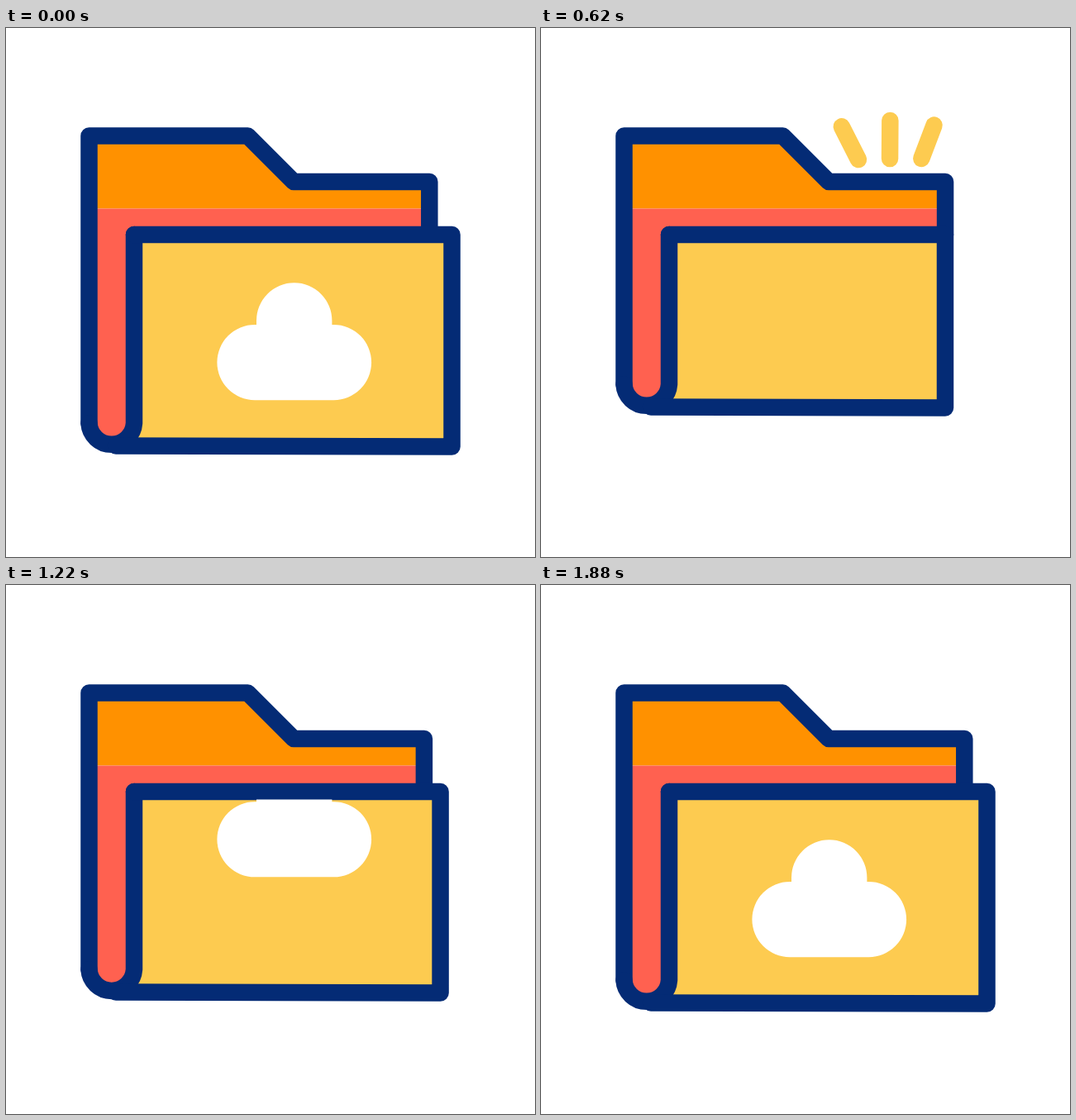
Write an HTML page with a canvas that moves like this. It is 640 px wide and 640 px high and loops after 2700 ms.

```html
<!DOCTYPE html>
<html lang="en">
<head>
<meta charset="utf-8">
<title>Folder upload and download</title>
<style>
html, body { margin: 0; height: 100%; overflow: hidden; background: #fff; }
canvas { display: block; width: 100vw; height: 100vh; object-fit: contain; }
</style>
</head>
<body>
<canvas id="stage" width="640" height="640"></canvas>
<script>
const LOOP = 2700;
const NAVY = '#042b75', ORANGE = '#ff9100', RED = '#ff6150', YELLOW = '#fdcb50';
const c = document.getElementById('stage').getContext('2d');
c.lineCap = c.lineJoin = 'round';

// Smooth progress from 0 to 1 between times a and b
function ease(t, a, b) {
  const u = Math.min(1, Math.max(0, (t - a) / (b - a)));
  return (1 - Math.cos(Math.PI * u)) / 2;
}

function fill(path, color) {
  c.fillStyle = color;
  c.fill(new Path2D(path));
}

function stroke(path, color, width = 20.5) {
  c.strokeStyle = color;
  c.lineWidth = width;
  c.stroke(new Path2D(path));
}

// A streak runs along its path: the head leaves first, the tail catches up
function streaks(lines, color, head, tail) {
  if (head <= 0 || tail >= 1) return;
  for (const [x1, y1, x2, y2] of lines) {
    const at = p => `${x1 + (x2 - x1) * p} ${y1 + (y2 - y1) * p}`;
    stroke(`M${at(tail)}L${at(head)}`, color);
  }
}

const RISE = [[266.5, 446, 266.5, 354], [342, 446, 342, 409], [425, 445, 425, 353]];
const FALL = [[262.5, 265, 262.5, 357], [345.5, 265, 345.5, 302], [421, 264, 421, 356]];
const BURST = [[387, 165, 354, 100], [422, 165, 422.5, 89.5], [458, 164, 483, 98]];

function folder(shrink) {
  const right = 539.5 - shrink, back = 512.3 - shrink * 0.46;
  const base = 505.5 - shrink * 0.93, bend = base - 27.3;
  const tab = `H292.5L348 186H${back}`;
  const pocket = `M155 250V${bend}A27.3 27.3 0 0 1 100.5 ${bend}`;

  fill(`M100.5 130.5${tab}V218.5H100.5Z`, ORANGE);
  fill(`M100.5 218.5H${back}V250H155V${bend}A27.3 27.3 0 0 1 100.5 ${bend}Z`, RED);
  stroke(`M${back} 250V186H348L292.5 130.5H100.5V${bend}`, NAVY);
  fill(`M155 250H${right}V${base + 1}L133 ${base}Q155 ${base} 155 ${bend}Z`, YELLOW);
  stroke(pocket, NAVY);
  stroke(`M155 250H${right}V${base + 1}L133 ${base}`, NAVY);
}

function cloud(y) {
  c.save();
  c.beginPath();
  c.rect(0, 259.5, 640, 380.5);
  c.clip();
  c.translate(0, y);
  fill('M301 359H303V354A45.7 45.7 0 0 1 394.4 354V359H396.5A45.6 45.6 0 0 1 396.5 450.2H301A45.6 45.6 0 0 1 301 359Z', '#fff');
  c.restore();
}

function draw(t) {
  c.fillStyle = '#fff';
  c.fillRect(0, 0, 640, 640);
  folder(53 * (ease(t, 30, 385) - ease(t, 460, 1618)));
  streaks(RISE, RED, ease(t, 67, 447), ease(t, 208, 588));
  streaks(BURST, YELLOW, ease(t, 376, 763), ease(t, 533, 983));
  streaks(FALL, RED, ease(t, 1290, 1560), ease(t, 1430, 1880));

  let y = -200 * ease(t, 60, 607);
  if (t > 800) y = -200 + 226.5 * ease(t, 972, 1500) - 26.5 * ease(t, 1500, 1880);
  cloud(y);
}

function tick() {
  draw(performance.now() % LOOP);
  requestAnimationFrame(tick);
}
tick();
</script>
</body>
</html>
```
